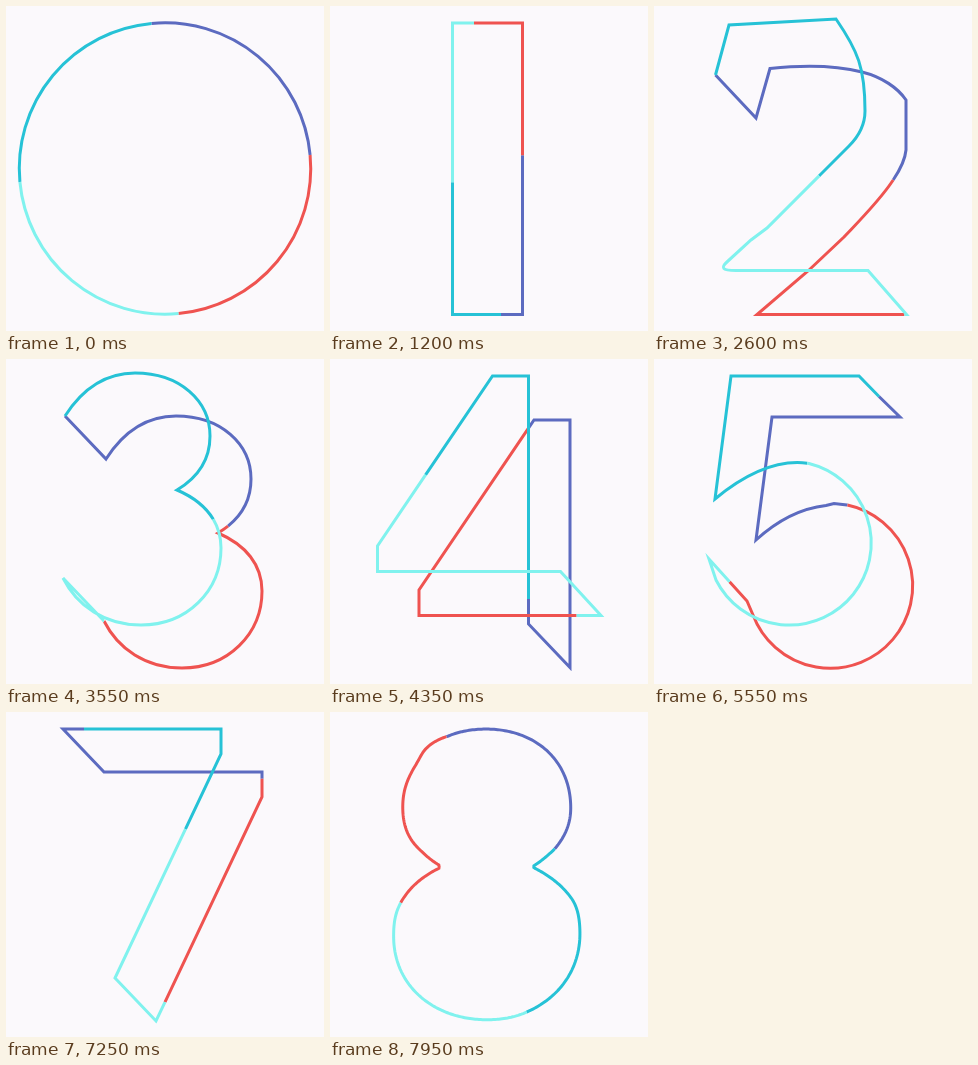
These frames come from a looping animation (318 by 325 pixels, 8000 ms). An HTML page:

```html
<!DOCTYPE html>
<html lang="en">
<head>
<meta charset="utf-8">
<title>Morphing digits</title>
<style>
  html, body { margin: 0; width: 100%; height: 100%; overflow: hidden; background: #fbf9fc; }
  svg { display: block; width: 100%; height: 100%; }
  path { fill: none; stroke-width: 3; stroke-miterlimit: 6; stroke-dasharray: 1 3; }
</style>
</head>
<body>
<svg id="stage" viewBox="0 0 318 325"></svg>
<script>
// Outlines of 0 to 8; each starts where the first colour begins.
const digits = [
  'M145.5 17.4A145.7 145.7 0 0 1 172.5 307.6A145.7 145.7 0 0 1 145.5 17.4Z',
  'M171 308.5H192.5V17H122.5V308.5Z',
  'M61.5 69L102 112L116 62.5C150 59 180 59 208 66C228 71 244 82 252 94V144' +
    'C251 155 246 164 238.5 175C226 194 208 212 190 231L154 265L103 308.5H252.5L214 264.5H82' +
    'C68 264.5 66 262 74 255L97 234L113 222L166 169L195 140C206 129 211 118 211 105' +
    'C211 62 204 45 182 13L75 19Z',
  'M59 57L100 100C118 72 140 57 170 57C215 57 245 85 245 120C245 145 232 162 212 174' +
    'C240 186 256 206 256 232C256 275 222 309 176 309C140 309 112 290 98 262L57 219' +
    'C71 247 99 266 135 266C181 266 215 232 215 189C215 163 199 143 171 131' +
    'C191 119 204 102 204 77C204 42 174 14 129 14C99 14 77 29 59 57Z',
  'M198.5 240V265L240 308.5V61H204L89 231V256.5H271L230.5 212.5H47.5V187L162.5 17H198.5Z',
  'M225 37.5L246 58H118L102 181C125 160 150 149 172 146.5L180 144.5L193 146' +
    'A82.5 82.5 0 1 1 99 256L93 242L55 200L62 221A82 82 0 1 0 155 104.5' +
    'C125 100 95 112 61 140L77 17H205Z',
  'M134.5 35.5L148 17L161 30l4 1l3 5L189 58L116 163C102 190 95 208 95 228C96 244 100 256 108 268' +
    'C125 294 150 307 180 307C222 307 259 270 259 230C259 190 230 153 184 151' +
    'C170 151 163 152 157 153L118 112C130 109 140 109 150 110C190 113 218 145 218 183' +
    'C218 220 195 250 165 260L152 263L146 265C100 268 72 237 61 212C56 200 55 192 55 187' +
    'C55 160 62 145 75 122Q83 108 95 91Z',
  'M78 17H57L98 60H256V85L150 309L109 266L215 42V17Z',
  'M225 137C238 122 241 108 241 96C241 48 205 17 156 17C143 17 130 19 118 24' +
    'C105 28 96 34 91 43L86 52C76 68 72.5 80 72.5 95C72.5 115 79 127 88 136' +
    'C95 143 102 149 109 153V156C95 163 82 172 72 188C65 200 63.5 210 63.5 224' +
    'C63.5 275 105 308 157 308C170 308 183 306 194 301.5C230 287 250 257 250 222' +
    'C250 200 245 190 238 182C230 172 218 163 204 156V154Q215 147 225 137Z'
];
const colors = ['#5c6bc0', '#ef5350', '#80f2ee', '#26c2d6'];
const layers = [0, 1, 3, 2];
const SAMPLES = 480, STEP = 1000, MORPH_START = 0.62, MORPH_END = 0.96;

const stage = document.getElementById('stage');
const newPath = () => document.createElementNS('http://www.w3.org/2000/svg', 'path');

function sample(d) {
  const path = newPath();
  path.setAttribute('d', d);
  const length = path.getTotalLength();
  return Array.from({ length: SAMPLES }, (_, i) => path.getPointAtLength(length * i / SAMPLES));
}

const outlines = digits.map(sample);
const strokes = layers.map(quarter => {
  const path = newPath();
  path.setAttribute('pathLength', 4);
  path.setAttribute('stroke', colors[quarter]);
  path.setAttribute('stroke-dashoffset', -quarter);
  return stage.appendChild(path);
});

function blend(from, to, k) {
  const mix = (a, b) => (a + (b - a) * k).toFixed(2);
  return 'M' + from.map((p, i) => mix(p.x, to[i].x) + ' ' + mix(p.y, to[i].y)).join('L') + 'Z';
}

function outlineAt(time) {
  const index = Math.floor(time / STEP);
  const u = (time / STEP - index - MORPH_START) / (MORPH_END - MORPH_START);
  if (u <= 0) return digits[index];
  if (u >= 1) return digits[index + 1];
  return blend(outlines[index], outlines[index + 1], (1 - Math.cos(Math.PI * u)) / 2);
}

const start = performance.now();
function draw() {
  const d = outlineAt((performance.now() - start) % (STEP * (digits.length - 1)));
  for (const path of strokes) path.setAttribute('d', d);
  requestAnimationFrame(draw);
}
draw();
</script>
</body>
</html>
```
